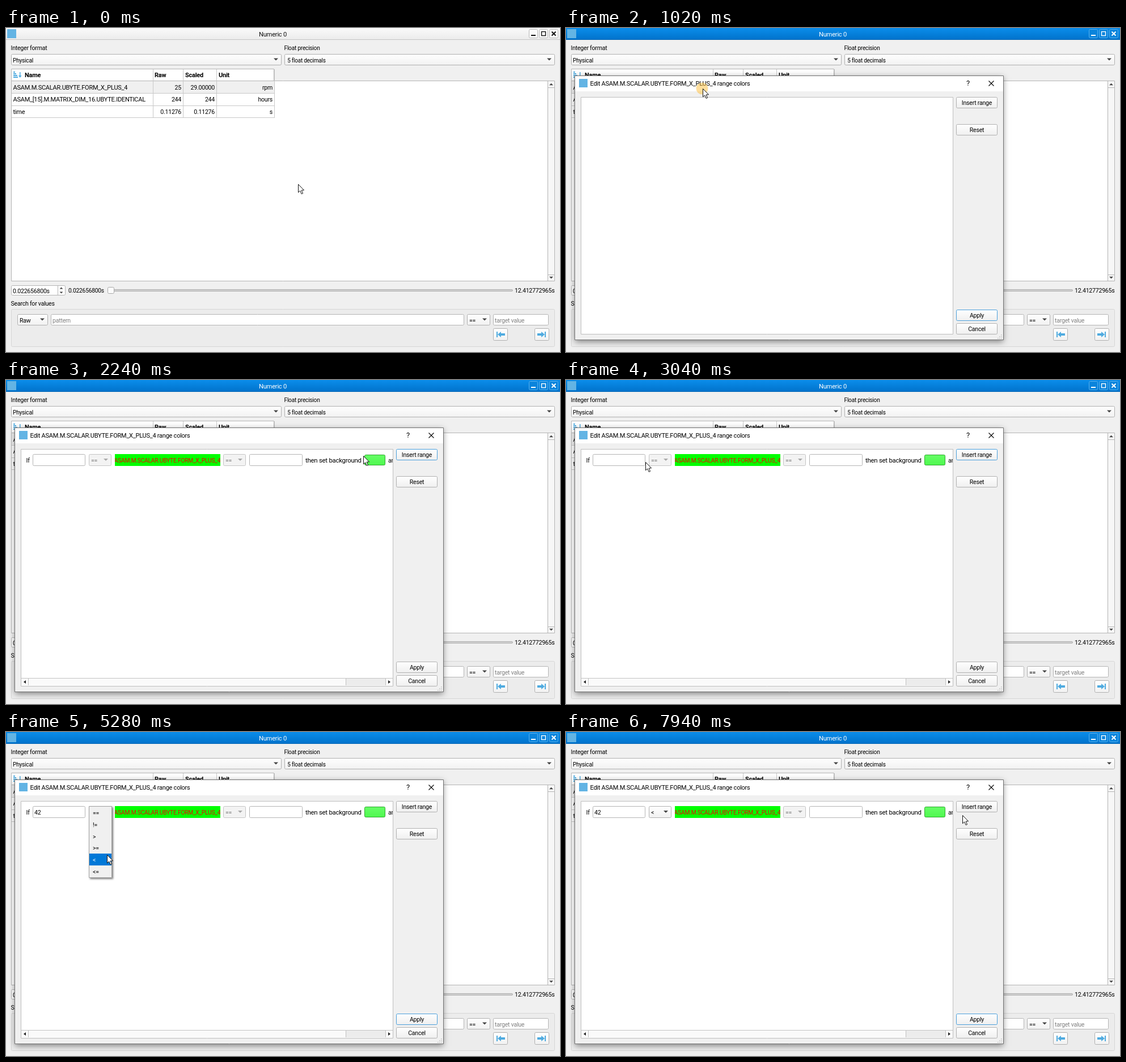
Animation of 977x573 px, one loop 8000 ms. Source, as an HTML page with a canvas:

```html
<!DOCTYPE html>
<html lang="en">
<head>
<meta charset="utf-8">
<title>Numeric range colors</title>
<style>
html, body { margin: 0; width: 100%; height: 100%; overflow: hidden; background: #f0f0f0; }
canvas { display: block; }
</style>
</head>
<body>
<canvas id="stage" width="977" height="573"></canvas>
<script>
const ctx = document.getElementById('stage').getContext('2d');
const LOOP = 8000;
const BLUE = '#0078d7', SKY = '#4fabe0', FOCUS = '#4a9fdb', EDGE = '#b4b4b4';
const SIGNAL = 'ASAM.M.SCALAR.UBYTE.FORM_X_PLUS_4';
const OPS = ['==', '!=', '>', '>=', '<', '<='];

// Screen updates come every 200 ms, a few of them 20 ms late.
const LATE = [5, 10, 15, 21, 28, 33, 36];
const ticks = Array.from({ length: 40 }, (_, k) => 200 * k + 20 * LATE.filter(n => n <= k).length);
const snap = t => ticks.filter(v => v <= t).pop();

// Pointer path: time, x, y
const PATH = [
  [0, 515, 276], [200, 470, 248], [400, 330, 165], [600, 243, 109], [800, 241, 107],
  [1020, 241, 107], [1220, 400, 126], [1420, 630, 134], [1620, 708, 134], [2040, 708, 134],
  [2240, 630, 134], [2440, 480, 139], [2840, 140, 145], [3060, 95, 142], [3660, 95, 142],
  [4060, 180, 139], [4280, 178, 143], [4480, 178, 144], [4880, 182, 178],
  [5280, 178, 217], [6100, 178, 217], [6500, 330, 165], [6920, 537, 150], [7120, 524, 146],
  [7340, 600, 140], [7540, 690, 145], [7740, 720, 157], [7940, 699, 147], [8000, 699, 147]
];
const CLICKS = [1820, 3060, 4280];

function pointerAt(t) {
  const i = PATH.findIndex(p => p[0] > t);
  const [t0, x0, y0] = PATH[i - 1], [t1, x1, y1] = PATH[i];
  const k = (t - t0) / (t1 - t0);
  return [x0 + (x1 - x0) * k, y0 + (y1 - y0) * k];
}

function fill(x, y, w, h, color) {
  ctx.fillStyle = color;
  ctx.fillRect(x, y, w, h);
}

function box(x, y, w, h, color, edge = EDGE, r = 0) {
  ctx.beginPath();
  ctx.roundRect(x + .5, y + .5, w - 1, h - 1, r);
  ctx.fillStyle = color;
  ctx.fill();
  ctx.strokeStyle = edge;
  ctx.lineWidth = 1;
  ctx.stroke();
}

function fade(y, h, top, bottom) {
  const g = ctx.createLinearGradient(0, y, 0, y + h);
  g.addColorStop(0, top);
  g.addColorStop(1, bottom);
  return g;
}

function shape(color, ...pts) {
  ctx.beginPath();
  for (let i = 0; i < pts.length; i += 2) ctx.lineTo(pts[i], pts[i + 1]);
  ctx.closePath();
  ctx.fillStyle = color;
  ctx.fill();
}

function line(color, width, x0, y0, x1, y1) {
  ctx.beginPath();
  ctx.moveTo(x0, y0);
  ctx.lineTo(x1, y1);
  ctx.strokeStyle = color;
  ctx.lineWidth = width;
  ctx.stroke();
}

// cy is the vertical middle of the capitals
function text(s, x, cy, { size = 10.6, color = '#000', align = 'left', weight = 400 } = {}) {
  ctx.font = `${weight} ${size}px Roboto, "Noto Sans", sans-serif`;
  ctx.letterSpacing = '-0.25px';
  ctx.textAlign = align;
  ctx.fillStyle = color;
  ctx.fillText(s, x, cy + 4);
}

const down = (x, y, r = 4, color = '#444') => shape(color, x - r, y - r / 2, x + r, y - r / 2, x, y + r / 2);
const up = (x, y, r = 3.5, color = '#444') => shape(color, x - r, y + r / 2, x + r, y + r / 2, x, y - r / 2);

function combo(x, y, w, h, label, on = true, size) {
  box(x, y, w, h, on ? fade(y, h, '#ffffff', '#f1f1f1') : '#f3f3f3', on ? '#b0b0b0' : '#c4c4c4', 2);
  text(label, x + (w > 100 ? 3 : 4), y + h / 2 + .5, { color: on ? '#000' : '#777', size });
  down(x + w - 10, y + h / 2 - .5, 4, on ? '#444' : '#aaa');
}

function input(x, y, w, h, label = '', color = '#000', focus = false) {
  box(x, y, w, h, '#fff', focus ? FOCUS : EDGE, 2);
  text(label, x + 3, y + h / 2 + .5, { color });
}

function button(y, label, focus) {
  box(688, y, 73, 20, fade(y, 20, '#ffffff', '#efefef'), focus ? FOCUS : '#b0b0b0', 2);
  text(label, 724.5, y + 10, { align: 'center' });
}

function titleBar(active) {
  fill(0, 0, 977, 21, active ? fade(0, 21, '#0b8dea', '#0072cb') : fade(0, 21, '#fafafa', '#ebebeb'));
  fill(0, 20, 977, 1, active ? '#0064b4' : '#c4c4c4');
  fill(2, 2, 16, 16, '#63b4e4');
  text('Numeric 0', 470.5, 11, { size: 11.2, align: 'center', color: active ? '#fff' : '#111' });
  const ink = active ? '#fff' : '#111';
  for (const x of [922, 940, 958]) {
    box(x, 2, 16, 16, active ? '#0a84dc' : '#fbfbfb', active ? '#58b0ec' : '#b8b8b8', 2);
  }
  fill(926, 12, 8, 2, ink);
  ctx.strokeStyle = ink;
  ctx.lineWidth = 1.4;
  ctx.strokeRect(944.5, 6.5, 7, 7);
  line(ink, 2, 962.5, 6.5, 969.5, 13.5);
  line(ink, 2, 969.5, 6.5, 962.5, 13.5);
}

function table(selected) {
  box(9, 93, 959, 355, '#fff', EDGE);
  fill(955, 94, 12, 353, '#f7f7f7');
  fill(955, 94, 1, 353, EDGE);
  fill(956, 105, 11, 1, EDGE);
  fill(956, 436, 11, 1, EDGE);
  up(961.5, 99.5);
  down(961.5, 441.5, 3.5);

  box(9, 72, 464, 22, '#fff', EDGE);
  [3, 5, 7, 8].forEach((w, i) => fill(13, 77 + i * 3, w, 2, SKY));
  fill(24, 78, 1.5, 7, SKY);
  shape(SKY, 22, 84, 27.5, 84, 24.75, 88);
  const cols = [259, 312, 371, 473];
  [['Name', 33], ['Raw', 262], ['Scaled', 316], ['Unit', 375]]
    .forEach(([s, x]) => text(s, x, 83, { weight: 700, size: 11 }));

  const rows = [
    [SIGNAL, '25', '29.00000', 'rpm'],
    ['ASAM_[15].M.MATRIX_DIM_16.UBYTE.IDENTICAL', '244', '244', 'hours'],
    ['time', '0.11276', '0.11276', 's']
  ];
  fill(10, 94, 463, 21, selected ? BLUE : '#f0f0f0');
  rows.forEach((row, i) => {
    const cy = 104.5 + i * 21.7;
    const color = selected && !i ? '#fff' : '#000';
    fill(10, [115, 137, 158][i], 463, 1, '#c8c8c8');
    text(row[0], 12.5, cy, { size: 11, color });
    row.slice(1).forEach((s, c) => text(s, cols[c + 1] - 3, cy, { color, align: 'right' }));
  });
  cols.forEach(x => fill(x, 73, 1, 86, '#c8c8c8'));
}

function jumpButton(x, dir) {
  box(x, 531, 26, 22, fade(531, 22, '#ffffff', '#f1f1f1'), '#b0b0b0', 2);
  const c = x + 13, p = v => c + dir * v;
  shape(SKY, p(-8), 540, p(-1), 540, p(-1), 537, p(5), 542, p(-1), 547, p(-1), 544, p(-8), 544);
  fill(p(6) - 1, 537, 2, 10, SKY);
}

function mainWindow(active, selected) {
  fill(0, 0, 977, 573, '#f0f0f0');
  titleBar(active);
  text('Integer format', 8.5, 35);
  text('Float precision', 490.5, 35, { size: 10.2 });
  combo(9, 46, 477, 20, 'Physical', true, 10.2);
  combo(491, 46, 477, 20, ' 5 float decimals', true, 10);
  table(selected);

  input(9, 455, 96, 18, '0.022656800s');
  fill(91, 456, 1, 16, EDGE);
  up(97.5, 460, 3);
  down(97.5, 468, 3);
  text('0.022656800s', 110, 464, { size: 10.3 });
  box(180, 462, 714, 4, '#d0d0d0', '#b0b0b0', 2);
  box(179, 458, 12, 12, '#fbfbfb', '#a8a8a8', 2);
  text('12.412772965s', 967.5, 464, { size: 10.6, align: 'right' });

  text('Search for values', 8.5, 487);
  box(9, 497, 959, 67, '#ececec', '#d6d6d6', 2);
  combo(20, 506, 54, 20, 'Raw');
  input(79, 506, 729, 20, 'pattern', '#808080');
  combo(813, 506, 41, 20, '==');
  input(859, 506, 98, 20, 'target value', '#808080');
  jumpButton(859, -1);
  jumpButton(932, 1);
}

function rangeRow(t) {
  const typed = t < 3460 ? '' : t < 3660 ? '4' : '42';
  const focus = t >= 3060 && t < 4480;
  ctx.save();
  ctx.beginPath();
  ctx.rect(27, 123, 655, 417);
  ctx.clip();
  text('If', 35.5, 142);
  input(47, 131, 93, 21, typed, '#000', focus);
  if (focus) fill(50.5 + typed.length * 5.5, 135, 1, 13, '#000');
  combo(146, 131, 40, 21, t < 6100 ? '==' : '<', typed !== '');
  combo(383, 131, 40, 21, '==', false);
  input(429, 131, 94, 21);
  text('then set background', 528, 142, { size: 11.4 });
  box(632, 132, 37, 19, fade(132, 19, '#66ff66', '#4ef74e'), '#2ea82e', 2);
  text('and', 674, 142);
  ctx.beginPath();
  ctx.rect(192, 131, 186, 21);
  ctx.clip();
  fill(192, 131, 186, 21, '#00ff00');
  text(SIGNAL, 284.5, 142, { size: 10.25, color: '#f00000', align: 'center' });
  ctx.restore();

  fill(27, 528, 655, 12, '#fafafa');
  fill(27, 527, 655, 1, '#c4c4c4');
  fill(599, 528, 70, 12, '#ececec');
  for (const x of [39, 599, 669]) fill(x, 528, 1, 12, '#c0c0c0');
  shape('#222', 35, 531, 35, 537, 31, 534);
  shape('#222', 674, 531, 674, 537, 678, 534);
}

function popup(y) {
  const hover = Math.max(0, Math.floor((y - 132) / 20.8));
  ctx.save();
  ctx.shadowColor = 'rgba(0,0,0,.5)';
  ctx.shadowBlur = 3;
  ctx.shadowOffsetX = ctx.shadowOffsetY = 2;
  fill(146, 131, 41, 127, '#f0f0f0');
  ctx.restore();
  box(146, 131, 41, 127, '#f0f0f0', '#a0a0a0');
  OPS.forEach((op, i) => {
    const top = 132 + i * 20.8;
    if (i === hover) fill(147, Math.round(top), 39, 21, BLUE);
    text(op, 153, top + 11, { color: i === hover ? '#fff' : '#000' });
  });
}

function dialog(t) {
  ctx.save();
  ctx.shadowColor = 'rgba(0,0,0,.45)';
  ctx.shadowBlur = 10;
  ctx.shadowOffsetY = 3;
  fill(16, 84, 755, 468, '#f0f0f0');
  ctx.restore();
  box(15, 84, 757, 468, '#f0f0f0', '#707070');
  fill(16, 85, 755, 27, '#fff');
  fill(23, 90, 15, 15, '#63b4e4');
  text(`Edit ${SIGNAL} range colors`, 42.5, 98, { size: 11 });
  text('?', 709, 98, { size: 13, align: 'center' });
  line('#111', 1.2, 745.5, 93.5, 754.5, 102.5);
  line('#111', 1.2, 754.5, 93.5, 745.5, 102.5);

  box(26, 122, 657, 420, '#fff', '#bdbdbd');
  const insertFocus = t >= 1820 && t < 3060;
  button(122, 'Insert range', insertFocus);
  button(170, 'Reset');
  button(498, 'Apply', !insertFocus);
  button(522, 'Cancel');
  for (let i = 0; i < 3; i++) {
    for (let j = 0; j <= i; j++) fill(767 - j * 3, 542 + i * 3, 1.5, 1.5, '#c0c0c0');
  }
  if (t >= 2040) rangeRow(t);
}

function disc(x, y, r, color) {
  ctx.beginPath();
  ctx.arc(x, y, r, 0, 7);
  ctx.fillStyle = color;
  ctx.fill();
}

function pointer(x, y) {
  ctx.save();
  ctx.translate(x + .5, y + .5);
  ctx.lineJoin = 'miter';
  shape('#fff', 0, 0, 0, 14.3, 3.2, 11.4, 5.7, 17, 8, 16, 5.6, 10.5, 10, 10.3);
  ctx.strokeStyle = '#111';
  ctx.lineWidth = 1;
  ctx.stroke();
  ctx.restore();
}

function draw(t) {
  const [x, y] = pointerAt(t);
  mainWindow(t >= 800, t >= 800 && t < 1020);
  if (t >= 1020) dialog(t);
  if (t >= 4480 && t < 6100) popup(y);
  if (t === 800) disc(240, 107, 11, 'rgba(213,220,37,.6)');
  if (t === 1020) disc(240, 107, 10.5, 'rgba(255,190,55,.5)');
  if (CLICKS.includes(t)) disc(x, y, 10.5, 'rgba(255,190,55,.5)');
  pointer(x, y);
}

const start = performance.now();
function frame() {
  draw(snap((performance.now() - start) % LOOP));
  requestAnimationFrame(frame);
}
frame();
</script>
</body>
</html>
```
